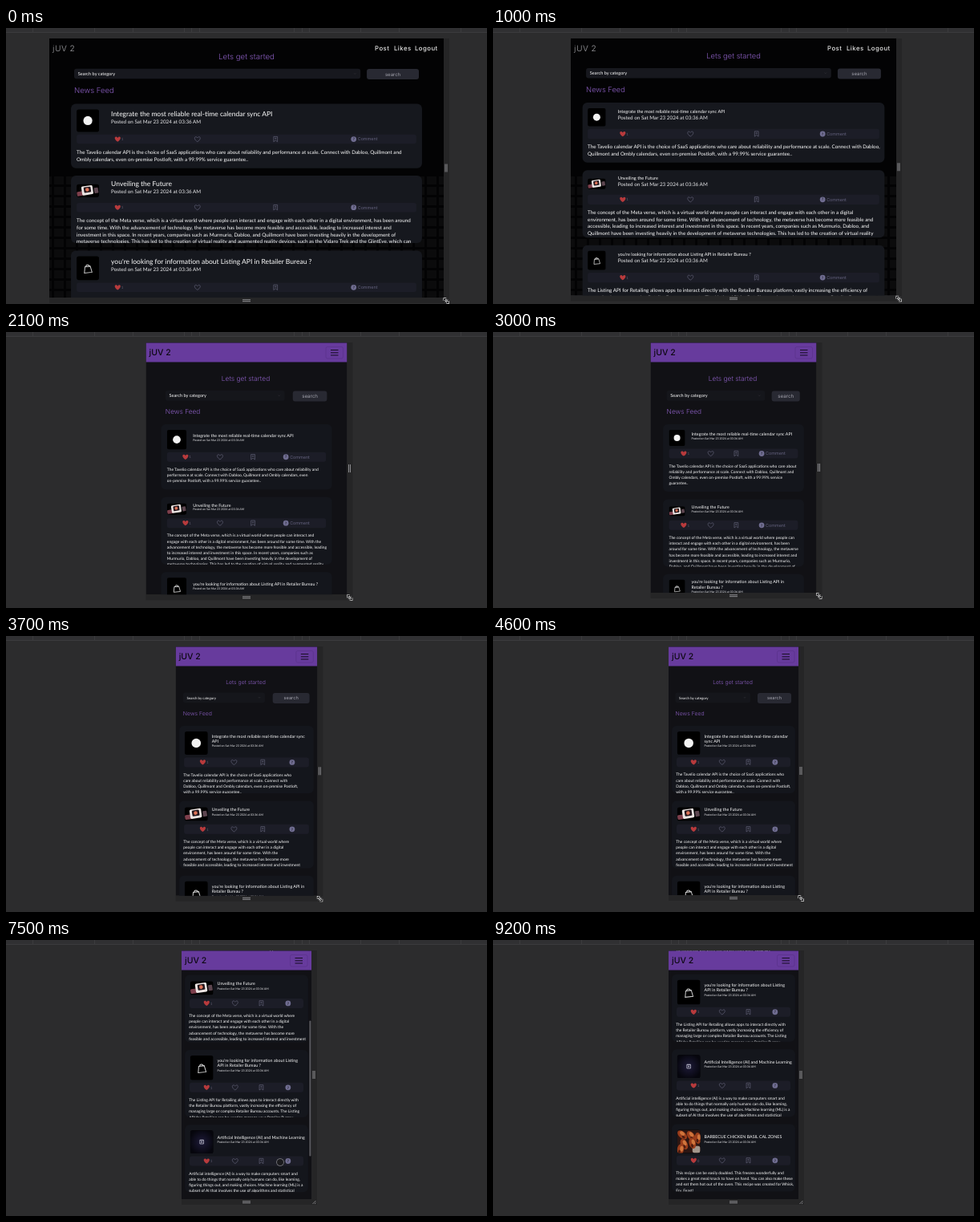
Write an HTML page with a canvas that moves like this. It is 600 px wide and 344 px high and loops after 9300 ms.

```html
<!DOCTYPE html>
<html lang="en">
<head>
<meta charset="utf-8">
<title>Responsive feed</title>
<style>
html, body { margin: 0; width: 100%; height: 100%; overflow: hidden; background: #2c2c2d; }
canvas { display: block; width: 600px; height: 344px; }
</style>
</head>
<body>
<canvas id="stage"></canvas>
<script>
const canvas = document.getElementById('stage');
const ctx = canvas.getContext('2d');
const ratio = window.devicePixelRatio || 1;
canvas.width = 600 * ratio;
canvas.height = 344 * ratio;
ctx.textRendering = 'geometricPrecision';

const LOOP = 9300, STEP = 100, TOP = 13, MID = 300;
const SANS = 'Lato, sans-serif', GEO = 'Inter, sans-serif';
const POSTED = 'Posted on Sat Mar 23 2024 at 03:36 AM';

// "|" marks the line breaks of the narrow phone layout.
const POSTS = [
  { title: 'Integrate the most reliable real-time calendar sync API', art: drawDisc, likes: 1,
    body: 'The Tavelio calendar API is the choice of SaaS applications who |care about reliability and performance at scale. Connect with |Dabloo, Quillmont and Ombly calendars, even on-premise Postloft, |with a 99.99% service guarantee..' },
  { title: 'Unveiling the Future', art: drawDesk, likes: 1, aspect: 0.58,
    body: 'The concept of the Meta verse, which is a virtual world where |people can interact and engage with each other in a digital |environment, has been around for some time. With the |advancement of technology, the metaverse has become more |feasible and accessible, leading to increased interest and investment |in this space. In recent years, companies such as Murmurio, Dabloo, and Quillmont have been investing heavily in the development of metaverse technologies. This has led to the creation of virtual reality and augmented reality devices, such as the Vidaro Trek and the GlintEye, which can be used to access the' },
  { title: "you're looking for information about Listing API in Retailer Bureau ?", art: drawBag, likes: 1, aspect: 1.06,
    body: 'The Listing API for Retailing allows apps to interact directly with |the Retailer Bureau platform, vastly increasing the efficiency of |managing large or complex Retailer Bureau accounts. The Listing |API for Retailing can be used to manage your Retailer Bureau' },
  { title: 'Artificial Intelligence (AI) and Machine Learning', art: drawChip, likes: 1,
    body: 'Artificial intelligence (AI) is a way to make computers smart and |able to do things that normally only humans can do, like learning, |figuring things out, and making choices. Machine learning (ML) is a |subset of AI that involves the use of algorithms and statistical' },
  { title: 'BARBECUE CHICKEN BASIL CAL ZONES', art: drawFood, likes: 0,
    body: 'This recipe can be easily doubled. This freezes wonderfully and |makes a great meal/snack to have on hand. You can also make these |and eat them hot out of the oven. This recipe was created for Whisk, |Fry, Feast!' }
];

// Layout per breakpoint; horizontal values are shares of the page width.
const WIDE = { card: .055, pad: 7, side: .063, input: .211, button: [.195, .063], thumb: .057, gap: 15, minHead: 23.5,
  title: 8.5, titleLine: 0, titleY: -5.8, posted: 6.3, postedY: 3.3, body: 6.3, line: 8.8, bodyY: 24, rowH: 11.5,
  head: 9.7, headY: 38.7, news: 9.5, newsY: 80.7, searchY: 50.7, searchH: 12.5, hint: 5.6, label: 6, firstY: 94.4 };
const MEDIUM = { ...WIDE, card: .036, pad: 6.5, side: .047, input: .2, button: [.18, .047], thumb: .0555, minHead: 20,
  title: 5.65, titleY: -5.3, postedY: 2.8, bodyY: 24.2, rowH: 12.3, head: 9.4, headY: 38.3, news: 9.3, newsY: 80,
  searchY: 50, firstY: 92.9 };
const SMALL = { ...MEDIUM, mobile: true, card: .075, pad: 7.5, side: .097, input: .31, button: [.27, .1], thumb: .097, gap: 8,
  minHead: 16, title: 5.3, titleLine: 7, titleY: -3, posted: 3.6, postedY: 1.6, body: 4.93, line: 7.2, bodyY: 23.2, rowH: 12,
  head: 8.4, headY: 61, news: 8.3, newsY: 102, searchY: 73, searchH: 12.8, label: 6.2, firstY: 115 };
const PHONE = { ...SMALL, phone: true, card: .025, pad: 5.2, side: .052, input: .37, button: [.315, .055], thumb: .178, gap: 5,
  minHead: 19, titleLine: 6, titleY: -3.8, head: 6.9, headY: 60, news: 6.9, newsY: 99,
  searchY: 70.5, hint: 4.4, label: 5.7, firstY: 112 };

function layoutFor(w) {
  if (w > 410) return WIDE;
  if (w > 315) return { ...MEDIUM, gap: Math.max(6, 8 + (w - 340) * .106) };
  return w > 197 ? SMALL : PHONE;
}

function along(x, points) {
  if (x <= points[0][0]) return points[0][1];
  for (let i = 1; i < points.length; i++) {
    const [x0, y0] = points[i - 1], [x1, y1] = points[i];
    if (x <= x1) return y0 + (y1 - y0) * (x - x0) / (x1 - x0);
  }
  return points[points.length - 1][1];
}
const ease = (t, a, b) => {
  const p = Math.min(1, Math.max(0, (t - a) / (b - a)));
  return p * p * (3 - 2 * p);
};

const widthAt = t => along(t, [[0, 492], [300, 478], [1000, 406], [1500, 340], [2000, 260], [2400, 224], [2800, 211], [3000, 207], [3900, 168], [4400, 162]]);
const bottomFor = w => along(w, [[162, 323], [207, 325], [340, 331.5], [406, 333.5], [492, 336]]);
const scrollAt = t => 251 * ease(t, 5250, 6100) + 5 * ease(t, 6150, 6500)
  - 120 * (ease(t, 6700, 7150) - ease(t, 7350, 7850));

function box(x, y, w, h, r, fill) {
  ctx.beginPath();
  ctx.roundRect(x, y, w, h, r);
  ctx.fillStyle = fill;
  ctx.fill();
}
function disc(x, y, r, fill) {
  ctx.beginPath();
  ctx.arc(x, y, r, 0, 7);
  ctx.fillStyle = fill;
  ctx.fill();
}
function line(points, color, width = 1) {
  ctx.beginPath();
  points.forEach(([x, y], i) => i ? ctx.lineTo(x, y) : ctx.moveTo(x, y));
  ctx.strokeStyle = color;
  ctx.lineWidth = width;
  ctx.stroke();
}
function text(str, x, y, size, color, { family = SANS, weight = 400, align = 'left', spacing = 0 } = {}) {
  ctx.font = `${weight} ${size}px ${family}`;
  ctx.letterSpacing = spacing + 'px';
  ctx.textAlign = align;
  ctx.fillStyle = color;
  ctx.fillText(str, x, y);
  ctx.letterSpacing = '0px';
}
function wrap(str, size, width) {
  ctx.font = `400 ${size}px ${SANS}`;
  const lines = [''];
  for (const word of str.split(' ')) {
    const last = lines[lines.length - 1];
    const next = last ? last + ' ' + word : word;
    if (last && ctx.measureText(next).width > width) lines.push(word);
    else lines[lines.length - 1] = next;
  }
  return lines;
}

// Thumbnails are drawn in a unit square.
function drawDisc() { disc(.5, .5, .2, '#f2f2f2'); }
function drawDesk() {
  ctx.save();
  ctx.translate(.5, .5);
  ctx.rotate(-.15);
  box(-.5, -.02, .3, .2, .05, '#7d3f4c');
  box(-.27, -.22, .5, .4, .06, '#ece5e3');
  box(-.17, -.17, .31, .25, .04, '#24171d');
  disc(-.02, -.05, .08, '#dd7358');
  box(.28, -.08, .18, .24, .03, '#5d4650');
  ctx.restore();
}
function drawBag() {
  ctx.save();
  ctx.translate(.5, .53);
  ctx.rotate(-.1);
  line([[-.12, -.1], [.12, -.1], [.17, .17], [-.17, .17], [-.12, -.1], [.12, -.1]], '#cfcfcf', .035);
  ctx.beginPath();
  ctx.arc(0, -.1, .075, Math.PI, 0);
  ctx.stroke();
  ctx.restore();
}
function drawChip() {
  const glow = ctx.createRadialGradient(.5, .5, 0, .5, .5, .55);
  glow.addColorStop(0, '#1d1a38');
  glow.addColorStop(1, '#06060d');
  ctx.fillStyle = glow;
  ctx.fillRect(0, 0, 1, 1);
  line([[.42, .42], [.58, .42], [.58, .58], [.42, .58], [.42, .42], [.58, .42]], '#b5b5c4', .03);
  box(.47, .47, .06, .06, 0, '#b5b5c4');
}
function drawFood() {
  ctx.fillStyle = '#2d1612';
  ctx.fillRect(0, 0, 1, 1);
  box(.66, .7, .34, .3, .1, '#a3968c');
  [[.22, .22], [.6, .26], [.3, .62], [.66, .58], [.9, .36], [.14, .85]].forEach(([x, y], i) => {
    ctx.save();
    ctx.translate(x, y);
    ctx.rotate(.7 + i * .2);
    ctx.scale(1, .6);
    disc(0, 0, .24, '#9a3d1b');
    disc(-.04, -.08, .12, '#d0753c');
    disc(.1, .06, .08, '#4c1b10');
    ctx.restore();
  });
}

function heart(x, y, s, color, filled) {
  ctx.beginPath();
  ctx.moveTo(x, y + s * .85);
  ctx.bezierCurveTo(x - s * 1.7, y - s * .1, x - s * .8, y - s * 1.5, x, y - s * .45);
  ctx.bezierCurveTo(x + s * .8, y - s * 1.5, x + s * 1.7, y - s * .1, x, y + s * .85);
  if (filled) { ctx.fillStyle = color; ctx.fill(); }
  else { ctx.strokeStyle = color; ctx.lineWidth = .7; ctx.stroke(); }
}

function drawActions(x, y, w, h, lay, likes) {
  box(x, y, w, h, 3, '#1c1d27');
  const m = (w - 62) / 8, cy = y + h / 2;
  const [a, b, c, d] = lay.phone ? [.15, .4, .63, .865].map(k => x + w * k)
    : [x + m + 6, x + m * 3 + 15, x + m * 5 + 22, x + m * 7 + 29];
  heart(a, cy, 3.7, '#b83a3c', true);
  text(likes, a + 4.5, cy + 1.7, 4.5, '#5d5b70');
  heart(b, cy, 3.6, '#626278', false);
  line([[c - 2.4, cy - 3.2], [c + 2.4, cy - 3.2], [c + 2.4, cy + 3.2], [c, cy + 1.4], [c - 2.4, cy + 3.2], [c - 2.4, cy - 3.2]], '#626278', .7);
  line([[c - 1.2, cy - .9], [c + 1.2, cy - .9]], '#626278', .6);
  line([[c, cy - 2.1], [c, cy + .3]], '#626278', .6);
  disc(d, cy, 3.4, '#706d91');
  text('?', d, cy + 1.7, 4.6, '#1c1d27', { weight: 700, align: 'center' });
  if (!lay.phone) text('Comment', d + 5, cy + 1.9, 5.4, '#65637f', { family: GEO });
}

function drawCard(post, x, y, w, pageW, lay) {
  const inner = w - lay.pad * 2, left = x + lay.pad;
  const inset = lay.phone ? 1.5 : 0;
  const size = Math.min(29, pageW * lay.thumb), aspect = post.aspect || 1;
  const head = Math.max(size * aspect, lay.minHead), center = y + 7 + head / 2;
  const rowY = y + 10.4 + head;
  const body = lay.phone ? post.body.split('|') : wrap(post.body.replace(/\|/g, ''), lay.body, inner + 1);
  const firstLine = rowY + lay.bodyY;
  const height = Math.min(84, firstLine - y + (body.length - 1) * lay.line + 9);

  box(x, y, w, height, 6, lay.mobile ? '#14161c' : '#16181e');
  ctx.save();
  ctx.beginPath();
  ctx.roundRect(x, y, w, height, 6);
  ctx.clip();

  ctx.save();
  ctx.translate(left + inset, center - size / 2);
  ctx.scale(size, size);
  ctx.beginPath();
  ctx.roundRect(0, .5 - aspect / 2, 1, aspect, .1);
  ctx.clip();
  ctx.fillStyle = '#000';
  ctx.fillRect(0, -.1, 1, 1.2);
  post.art();
  ctx.restore();

  const tx = left + inset + size + lay.gap;
  const titles = lay.mobile ? wrap(post.title, lay.title, x + w - lay.pad - tx + 1) : [post.title];
  const shift = (titles.length - 1) * lay.titleLine / 2;
  titles.forEach((str, i) => text(str, tx, center + lay.titleY - shift + i * lay.titleLine, lay.title, '#fff'));
  text(POSTED, tx, center + lay.postedY + shift, lay.posted, '#ececee');

  drawActions(left + inset / 2, rowY, inner - inset, lay.rowH, lay, post.likes);
  body.forEach((str, i) => text(str.trim(), left, firstLine + i * lay.line, lay.body, '#fff'));
  ctx.restore();
  return height;
}

function drawBackdrop(l, r, bottom, lay) {
  ctx.fillStyle = lay.mobile ? '#111115' : '#030304';
  ctx.fillRect(l, TOP, r - l, bottom - TOP);
  if (lay.mobile) return;
  ctx.fillStyle = 'rgba(255,255,255,.03)';
  for (let y = 185; y < bottom; y += 13)
    for (let x = 0; x < r - MID; x += 15) {
      ctx.fillRect(MID + x, y, 12, 10);
      ctx.fillRect(MID - x - 15, y, 12, 10);
    }
}

function drawHeader(l, r, lay) {
  if (!lay.mobile) {
    text('jUV 2', l + 4, 28.6, 10.2, '#a3a3a7', { family: GEO, weight: 300, spacing: .5 });
    [['Post', 86], ['Likes', 62], ['Logout', 36]].forEach(([str, off]) =>
      text(str, r - off, 28, 7.8, '#e6e6e6', { family: GEO, weight: 500, spacing: .45 }));
    return;
  }
  ctx.fillStyle = '#673b9d';
  ctx.fillRect(l, TOP + .5, r - l, 24);
  text('jUV 2', l + 4, 29.2, 10.5, '#0d0912', { family: GEO, weight: 500 });
  ctx.beginPath();
  ctx.roundRect(r - 26.5, 18.5, 21.5, 14.5, 2);
  ctx.strokeStyle = '#5a338a';
  ctx.lineWidth = .7;
  ctx.stroke();
  for (const y of [22.5, 25.8, 29]) line([[r - 20.5, y], [r - 11, y]], '#150c20', 1);
}

function drawPage(t, l, r, bottom, lay) {
  const w = r - l, scroll = scrollAt(t);
  ctx.save();
  ctx.beginPath();
  ctx.rect(l, TOP, w, bottom - TOP);
  ctx.clip();
  drawBackdrop(l, r, bottom, lay);

  ctx.save();
  ctx.translate(0, -scroll);
  const purple = '#895dbf';
  text('Lets get started', MID + (lay.mobile ? -1 : 0), lay.headY, lay.head, purple, { family: GEO, weight: 300, align: 'center' });
  const sx = l + w * lay.side, sy = lay.searchY;
  box(sx, sy, w * (1 - lay.input - lay.side), lay.searchH, 3, lay.mobile ? '#15161b' : '#17181e');
  text('Search by category', sx + 4.7, sy + 8.2, lay.hint, '#fff');
  const ax = r - w * lay.input - 7;
  line([[ax - 1.2, sy + 5.6], [ax, sy + 6.8], [ax + 1.2, sy + 5.6]], '#34353c', .6);
  const [b0, b1] = lay.button;
  box(r - w * b0, sy + .4, w * (b0 - b1), 13, 3, '#282932');
  text('search', r - w * (b0 + b1) / 2, sy + 8.8, lay.label, '#a2a2ac', { family: GEO, align: 'center' });
  text('News Feed', sx, lay.newsY, lay.news, purple, { family: GEO, weight: 300 });

  let y = lay.firstY;
  for (const post of POSTS) {
    if (y - scroll > bottom) break;
    y += drawCard(post, l + w * lay.card, y, w * (1 - 2 * lay.card), w, lay) + 9.4;
  }
  ctx.restore();
  drawHeader(l, r, lay);

  const fade = ease(t, 5200, 5300) * (1 - ease(t, 8200, 8500));
  if (fade) {
    ctx.globalAlpha = fade;
    box(r - 2.6, TOP + scroll * .54, 2, 169, 1, '#5b5b60');
    ctx.globalAlpha = 1;
  }
  ctx.restore();
}

function drawFrame(l, r, bottom) {
  ctx.fillStyle = '#2c2c2d';
  ctx.fillRect(0, 0, 600, 344);
  ctx.fillStyle = '#303032';
  ctx.fillRect(0, 0, 600, 5);
  ctx.fillStyle = '#3b3b3d';
  ctx.fillRect(0, 5, 600, 1);
  for (const off of [59, 69, 78, 142, 190, 267])
    for (const side of [-1, 1]) ctx.fillRect(MID + side * off, 0, 1, 5);

  ctx.fillStyle = '#252526';
  ctx.fillRect(r, TOP, 7, bottom + 7 - TOP);
  ctx.fillRect(l, bottom, r - l, 7);
  const cy = (TOP + bottom) / 2;
  for (const d of [-1, 1]) {
    line([[r + 3 + d, cy - 5], [r + 3 + d, cy + 5]], '#9b9b9f', .9);
    line([[MID - 5, bottom + 3.7 + d], [MID + 5, bottom + 3.7 + d]], '#9b9b9f', .9);
  }
  line([[r + 1.5, bottom + 6], [r + 5.5, bottom + 2]], '#98989b', .8);
  line([[r + 4, bottom + 6], [r + 5.5, bottom + 4.5]], '#98989b', .8);
}

function drawResizeCursor(x, y) {
  for (const [color, width] of [['#f2f2f2', 2.2], ['#08080a', 1]]) {
    line([[x - 2.6, y - 2.6], [x + 2.6, y + 2.6]], color, width);
    line([[x - 2.6, y], [x - 2.6, y - 2.6], [x, y - 2.6]], color, width);
    line([[x, y + 2.6], [x + 2.6, y + 2.6], [x + 2.6, y]], color, width);
  }
}
function drawArrow(x, y) {
  ctx.beginPath();
  [[0, 0], [0, 8], [1.9, 6.3], [3.2, 9], [4.4, 8.4], [3.2, 5.8], [5.6, 5.6]].forEach(([dx, dy]) => ctx.lineTo(x + dx, y + dy));
  ctx.closePath();
  ctx.fillStyle = '#08080a';
  ctx.fill();
  ctx.strokeStyle = '#f2f2f2';
  ctx.lineWidth = .7;
  ctx.stroke();
}
function drawCursor(t, r, bottom) {
  if (t < 5000) return drawResizeCursor(r + 3.2, bottom + 4);
  if (t >= 9200) return;
  const x = along(t, [[5000, 385], [5300, 342], [7800, 342], [8000, 300], [8300, 258], [8600, 345], [8900, 448], [9100, 537]]);
  const y = along(t, [[5000, 328], [5300, 277], [7800, 277], [8000, 215], [8300, 186], [8600, 240], [8900, 277], [9100, 332]]);
  if (x > r) return drawArrow(x, y);
  disc(x, y, 4.8, '#85858a');
  disc(x, y, 4, '#1b1b1e');
}

function render(now) {
  const t = Math.floor((now % LOOP) / STEP) * STEP;
  const w = widthAt(t), l = MID - w / 2, r = MID + w / 2, bottom = bottomFor(w);
  ctx.setTransform(ratio, 0, 0, ratio, 0, 0);
  drawFrame(l, r, bottom);
  drawPage(t, l, r, bottom, layoutFor(w));
  drawCursor(t, r, bottom);
}

const start = performance.now();
function tick() {
  render(performance.now() - start);
  requestAnimationFrame(tick);
}
tick();
</script>
</body>
</html>
```
